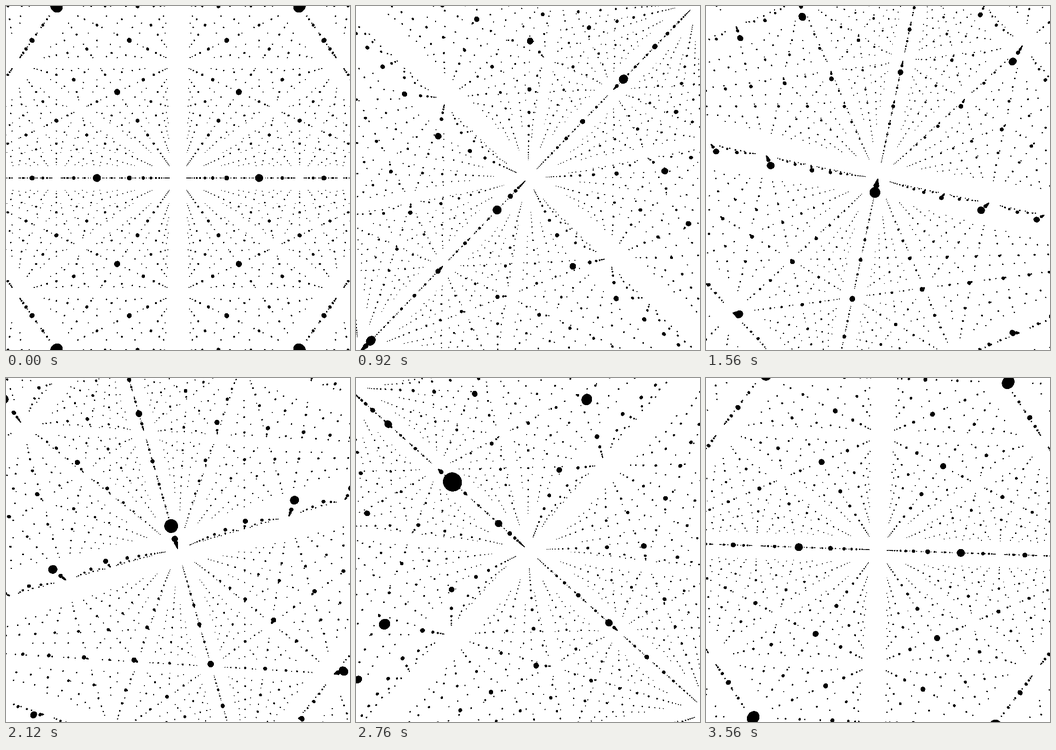
These frames come from a looping animation (748x748 px, 3.6 s). An HTML page with a canvas:

```html
<!DOCTYPE html>
<html lang="en">
<head>
<meta charset="utf-8">
<title>Flight through a cubic lattice</title>
<style>
html, body { margin: 0; width: 100%; height: 100%; overflow: hidden; background: #fff; }
canvas { display: block; }
</style>
</head>
<body>
<canvas id="stage" width="748" height="748"></canvas>
<script>
const SIZE = 748, HALF = SIZE / 2, FOCAL = SIZE;
const STEP = 40, STEPS = 90;
const REACH = 29, RADIUS = 0.049;
const ctx = document.getElementById('stage').getContext('2d', { willReadFrequently: true });

// Lattice points sit on odd coordinates; the camera looks along the (0, 1, 1) diagonal.
// The nearest row is left out, so nothing sweeps past right in front of the camera.
const points = [];
for (let u = -REACH; u <= REACH; u += 2)
  for (let v = -REACH; v <= REACH; v += 2)
    if (u + v > 2)
      for (let x = -REACH; x <= REACH; x += 2)
        points.push({ x, y: (u - v) / Math.SQRT2, z: (u + v) / Math.SQRT2 });

function drawSphere(x, y, z, cos, sin) {
  const scale = FOCAL / z, px = x * scale, py = y * scale;
  const sx = px * cos + py * sin, sy = py * cos - px * sin;
  const r = RADIUS * scale, dist = Math.hypot(sx, sy);
  const stretched = r * Math.hypot(FOCAL, dist) / FOCAL;
  const limit = HALF + stretched;
  if (Math.abs(sx) > limit || Math.abs(sy) > limit) return;
  ctx.beginPath();
  ctx.ellipse(HALF + sx, HALF + sy, stretched, r, Math.atan2(sy, sx), 0, 2 * Math.PI);
  ctx.fill();
}

// Reduce the picture to pure black and white.
function harden() {
  const image = ctx.getImageData(0, 0, SIZE, SIZE);
  const pixels = new Uint32Array(image.data.buffer);
  for (let i = 0; i < pixels.length; i++)
    pixels[i] = (pixels[i] & 255) < 128 ? 0xff000000 : 0xffffffff;
  ctx.putImageData(image, 0, 0);
}

function draw(t) {
  const angle = Math.PI * t, cos = Math.cos(angle), sin = Math.sin(angle);
  const sideways = 2 * t;
  const forward = 2 * Math.SQRT2 * t * t * (3 - 2 * t);
  ctx.fillStyle = '#fff';
  ctx.fillRect(0, 0, SIZE, SIZE);
  ctx.fillStyle = '#000';
  for (const p of points) {
    const z = p.z - forward;
    if (z > 0.1) drawSphere(p.x + sideways, p.y, z, cos, sin);
  }
  harden();
}

let shown = -1;
function tick() {
  const step = Math.floor(performance.now() / STEP) % STEPS;
  if (step !== shown) draw((shown = step) / STEPS);
  requestAnimationFrame(tick);
}
tick();
</script>
</body>
</html>
```
